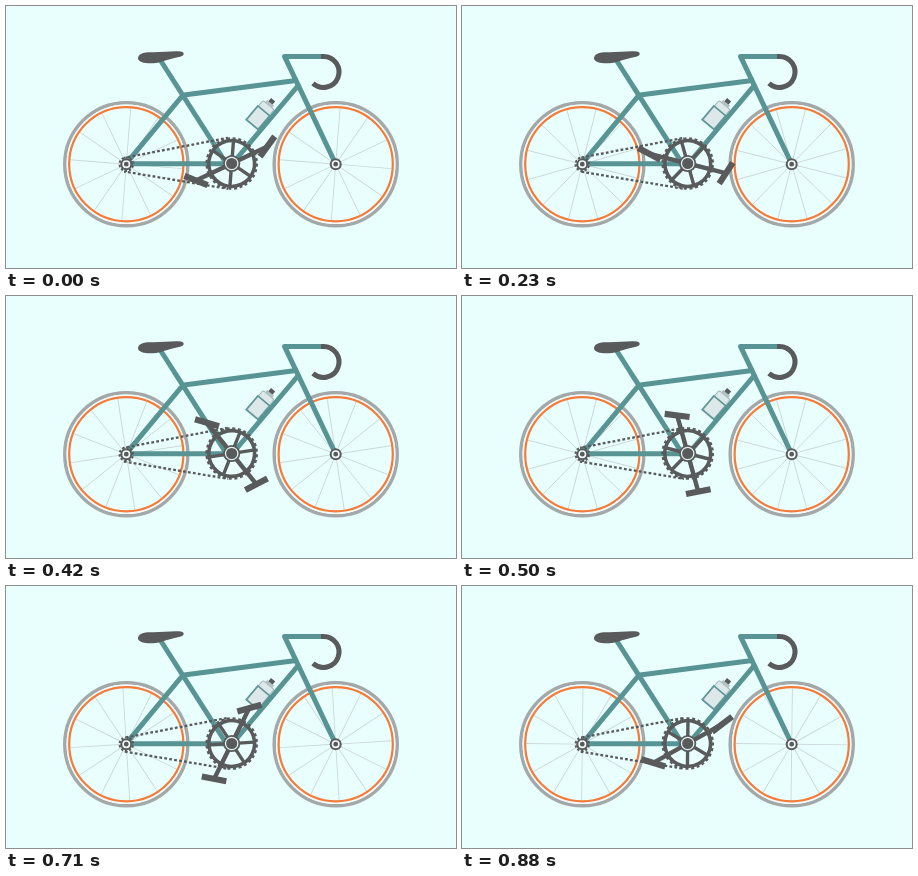
Write an HTML page that moves like this. It is 450 px wide and 262 px high and loops after 0.92 s.

```html
<!DOCTYPE html>
<html lang="en">
<head>
<meta charset="utf-8">
<title>Bicycle</title>
<style>
  html, body { margin: 0; width: 100%; height: 100%; overflow: hidden; background: #e9fffe; }
  svg { display: block; width: 100vw; height: 100vh; }
  .line { fill: none; stroke: #599494; stroke-width: 5; }
  .dark { fill: none; stroke: #595a5b; }
  .solid { fill: #595a5b; }
  .spokes { fill: none; stroke: #cbd8d8; stroke-width: .9; }
</style>
</head>
<body>
<svg viewBox="0 0 450 262">
  <defs>
    <g id="rim" fill="none">
      <circle r="61.5" stroke="#a3a8a9" stroke-width="3.5"/>
      <circle r="59" stroke="#f6fbfb" stroke-width="1.6"/>
      <circle r="57.1" stroke="#f47b39" stroke-width="2.2"/>
    </g>
    <g id="hub">
      <circle r="6" class="solid"/>
      <circle r="3.2" class="solid" stroke="#f2fbfb" stroke-width="1.6"/>
    </g>
    <rect id="pedal" class="solid" x="-12.5" y="-3.1" width="25" height="6.2"/>
  </defs>

  <g transform="translate(120.3 158.2)">
    <path id="rearSpokes" class="spokes"/>
    <use href="#rim"/>
  </g>
  <g transform="translate(329.7 158.2)">
    <path id="frontSpokes" class="spokes"/>
    <use href="#rim"/>
  </g>

  <path class="line" d="M153 52L220 157M176 89.200L292 74.200M293.500 78L226.500 157.500M225 157.800H120L177 89"/>
  <path class="line" d="M316 50.400H278.500L329.700 158" stroke-linejoin="round"/>
  <path class="dark" stroke-width="5" d="M315 50.400H317.500A15.500 15.500 0 1 1 307 77.300"/>
  <path class="solid" d="M132 52.500C132 48 137 46.200 145 46.200C156 46.500 166 44.600 175 45.500C179 46.500 178.500 49.800 174 50.800C166 52.300 161 54 155 56C148 58 133 58.500 132 52.500Z"/>

  <g transform="translate(254.6 108.6) rotate(40)">
    <rect x="-7.200" y="-12.500" width="14.400" height="25" rx="1.500" fill="#dce8e9" stroke="#9db3b5"/>
    <path d="M-4.500-12.500V-15.500H4.500V-12.500Z" fill="#b3c3c5"/>
    <rect x="-2.700" y="-19.500" width="5.400" height="4.200" class="solid"/>
    <path d="M-7.800-5H7.800V13.200H-7.800Z" fill="none" stroke="#5f9697" stroke-width="1.600"/>
  </g>

  <g transform="translate(120.3 158.2)">
    <circle id="cog" class="dark" r="6.7" stroke-width="2.2" stroke-dasharray="2.3 1.91"/>
    <use href="#hub"/>
  </g>
  <use href="#hub" x="329.7" y="158.2"/>
  <path id="chainTop" class="dark" stroke-width="2.3" d="M118 151.800L222 131.800"/>
  <path id="chainLow" class="dark" stroke-width="2.3" d="M222 182.800L118 165.500"/>

  <g transform="translate(225.7 157.5)">
    <g id="crank" class="dark">
      <circle r="22.9" stroke-width="3.6"/>
      <circle id="teeth" r="25.2" stroke-width="2.2"/>
      <path id="arms" stroke-width="3.4"/>
      <path d="M-39 0H39" stroke-width="4.4"/>
    </g>
    <circle r="8.6" class="solid"/>
    <circle r="6.2" class="solid" stroke="#dfeeee" stroke-width="1.3"/>
    <use id="pedalA" href="#pedal"/>
    <use id="pedalB" href="#pedal"/>
  </g>
</svg>
<script>
const LOOP = 920, ARM = 39.5;
const ticks = [0, 60, 90, 130, 170, 210, 260, 300, 340, 390, 450, 500, 540, 570,
  630, 670, 710, 740, 780, 810, 850, 880];
const keys = [0, 130, 300, 500, 630, 710, 880];
const turn = [-25.5, -2, 32.3, 74.5, 101.2, 116.5, 150.7];
const tiltA = [-54, -71, -41, -11, 3, 11, 17];
const tiltB = [22, 31, 24, 7, -6, -16, -37];
const $ = id => document.getElementById(id);
const rad = deg => deg * Math.PI / 180;

function star(count, inner, outer) {
  let d = '';
  for (let i = 0; i < count; i++) {
    const a = rad(i * 360 / count), c = Math.cos(a), s = Math.sin(a);
    d += `M${c * inner} ${s * inner}L${c * outer} ${s * outer}`;
  }
  return d;
}

function sample(values, t) {
  let i = 0;
  while (i < keys.length - 2 && t >= keys[i + 1]) i++;
  const k = (t - keys[i]) / (keys[i + 1] - keys[i]);
  return values[i] + (values[i + 1] - values[i]) * k;
}

function placePedal(id, deg, tilt) {
  const x = ARM * Math.cos(rad(deg)), y = ARM * Math.sin(rad(deg));
  $(id).setAttribute('transform', `translate(${x} ${y}) rotate(${tilt})`);
}

function draw(ms) {
  const now = ms % LOOP;
  const t = ticks.filter(v => v <= now).pop();
  const deg = sample(turn, t);
  for (const id of ['crank', 'cog', 'rearSpokes', 'frontSpokes'])
    $(id).setAttribute('transform', `rotate(${deg})`);
  placePedal('pedalA', deg, sample(tiltA, t));
  placePedal('pedalB', deg + 180, sample(tiltB, t));
  const travel = -rad(deg) * 80 / Math.PI;
  for (const id of ['chainTop', 'chainLow'])
    $(id).setAttribute('stroke-dashoffset', travel);
}

$('rearSpokes').setAttribute('d', star(12, 6, 56));
$('frontSpokes').setAttribute('d', star(12, 6, 56));
$('arms').setAttribute('d', star(6, 7, 22));
$('teeth').setAttribute('stroke-dasharray', `3 ${2 * Math.PI * 25.2 / 28 - 3}`);
for (const id of ['chainTop', 'chainLow'])
  $(id).setAttribute('stroke-dasharray', '2.8 2.2');

const start = performance.now();
function frame() {
  draw(performance.now() - start);
  requestAnimationFrame(frame);
}
draw(0);
requestAnimationFrame(frame);
</script>
</body>
</html>
```
